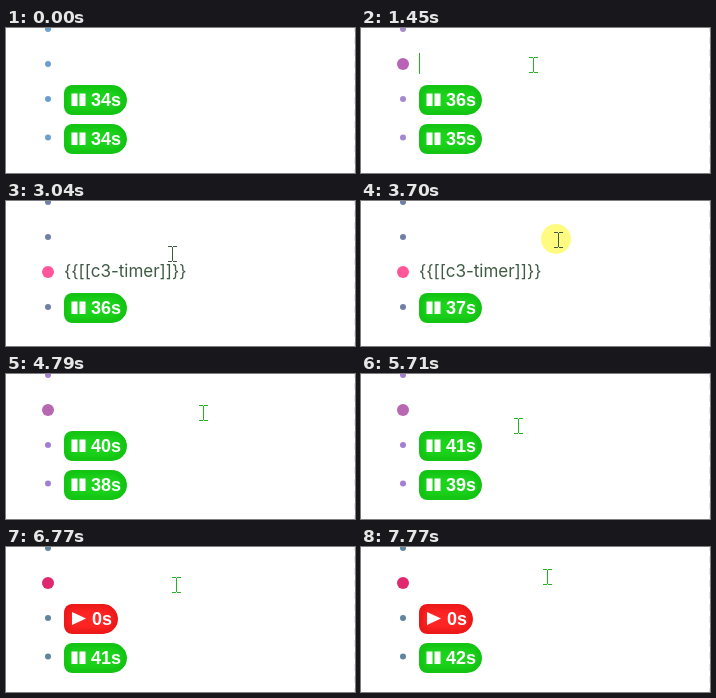
Write an HTML page with a canvas that moves like this. It is 349 by 145 pixels and loops after 8 s.

```html
<!DOCTYPE html>
<html lang="en">
<head>
<meta charset="utf-8">
<title>Timers</title>
<style>
html, body { margin: 0; width: 100%; height: 100%; overflow: hidden; background: #fff; }
canvas { display: block; }
</style>
</head>
<body>
<canvas id="stage" width="349" height="145"></canvas>
<script>
const ctx = document.getElementById('stage').getContext('2d');
const LOOP = 8000, TICK = 975, BLINK = 1050, CLICK = 90;
const GREEN = '#22b422', TEXT = '#3f5a44';

// A click comes just before each scene.
const scenes = [
  { name: 'idle', at: 0, small: '#6b9fd0' },
  { name: 'focus', at: 1440, small: '#a588d2', active: '#b963b6' },
  { name: 'edit', at: 2710, small: '#6f7fa8', active: '#ff5799' },
  { name: 'back', at: 3780, small: '#a27fd2', active: '#b868b2' },
  { name: 'press', at: 6210, small: '#7f90e2', active: '#ee5f95' },
  { name: 'paused', at: 6370, small: '#5f859f', active: '#e0286e' }
];

// Pointer moves, each from where the last one ended.
const entry = { x: 233, y: 62 };
const moves = [
  { from: 560, to: 1200, x: 172, y: 37 },
  { from: 1880, to: 2630, x: 150, y: 61 },
  { from: 2710, to: 3540, x: 197, y: 39 },
  { from: 5370, to: 6120, x: 105, y: 69 },
  { from: 6370, to: 6930, x: 186, y: 30 }
];

function pointerAt(t) {
  return moves.reduce((p, m) => {
    const u = Math.min(1, Math.max(0, (t - m.from) / (m.to - m.from)));
    const s = u * u * (3 - 2 * u);
    return { x: p.x + (m.x - p.x) * s, y: p.y + (m.y - p.y) * s };
  }, entry);
}

function disc(x, y, r, color) {
  ctx.fillStyle = color;
  ctx.beginPath();
  ctx.arc(x, y, r, 0, 7);
  ctx.fill();
}

function insetShade(shape, color) {
  const away = 400;
  ctx.shadowColor = color;
  ctx.shadowBlur = 8;
  ctx.shadowOffsetX = away;
  ctx.lineWidth = 4;
  ctx.translate(-away, 0);
  ctx.stroke(shape);
}

function button(y, seconds, fill, shade) {
  const label = seconds + 's';
  const x = seconds ? 85 : 86;
  ctx.font = 'bold 18px "Liberation Sans", Arial, sans-serif';
  const w = Math.round(ctx.measureText(label).width) + x - 52;
  const shape = new Path2D();
  shape.roundRect(58, y, w, 30, [8, 15, 15, 8]);
  ctx.save();
  ctx.clip(shape);
  ctx.fillStyle = fill;
  ctx.fill(shape);
  if (shade) insetShade(shape, shade);
  ctx.restore();

  ctx.fillStyle = '#fff';
  if (seconds) {
    for (const bar of [65.5, 73.5]) ctx.fillRect(bar, y + 8.5, 6, 12.5);
  } else {
    ctx.fill(new Path2D(`M66 ${y + 8}l14 6.5l-14 6.5z`));
  }
  ctx.fillText(label, x, y + 21);
}

const greenButton = (y, seconds) => button(y, seconds, '#1cd41c', '#06a806');
const redButton = (y, seconds) => button(y, seconds, '#ff2626', '#cc0404');

function beam(x, y, color) {
  x = Math.round(x);
  y = Math.round(y);
  ctx.fillStyle = color;
  ctx.fillRect(x, y - 7, 1, 14);
  for (const dy of [-8, 7]) {
    ctx.fillRect(x - 4, y + dy, 4, 1);
    ctx.fillRect(x + 1, y + dy, 4, 1);
  }
}

function hand(x, y, color) {
  ctx.save();
  ctx.translate(Math.round(x) - 7, Math.round(y) - 2);
  ctx.strokeStyle = color;
  ctx.lineWidth = 1;
  ctx.stroke(new Path2D('M2.5 1.5Q4 0 5.5 2V7.5Q7.5 6 8.5 8Q10.5 7 11.5 9Q14 8 14.5 11V15L12.5 21.5H5.5L0.5 13.5Q0 11 2.5 12Z'));
  ctx.restore();
}

function draw(t) {
  const scene = scenes.findLast(s => s.at <= t), step = scenes.indexOf(scene);
  const next = scenes[step + 1];
  const editing = scene.name === 'edit', paused = scene.name === 'paused';
  const clicking = next && next.at - t <= CLICK;
  const p = pointerAt(t);
  const over = !editing && p.x < 121 && p.y > 57 && p.y < 87;

  ctx.fillStyle = '#fff';
  ctx.fillRect(0, 0, 349, 145);
  ctx.fillStyle = '#e6e6e6';
  for (let y = -3; y < 145; y += 12) ctx.fillRect(348, y, 1, 7);

  const selected = step === 0 ? -1 : editing ? 2 : 1;
  [1, 36, 71, editing ? 106 : 109.5].forEach((y, i) =>
    i === selected ? disc(42, y, 6, scene.active) : disc(42, y, 3, scene.small));

  // The caret restarts its blink when the line gets focus.
  const focusAt = scenes[step < 3 ? 1 : 3].at;
  if (step > 0 && !editing && (t - focusAt) % BLINK < BLINK / 2) {
    ctx.fillStyle = GREEN;
    ctx.fillRect(58, 25, 1, 21);
  }

  // Redrawing a timer shifts its phase.
  const ticks = 34 + (t + 575) / TICK;
  const upper = paused ? 0 : Math.floor(ticks + (step >= 3 ? 1 : 0));
  const lower = Math.floor(ticks - (paused ? 0.5 : step > 0 ? 1 : 0));

  if (editing) {
    ctx.font = '17px Inter, sans-serif';
    ctx.fillStyle = TEXT;
    ctx.fillText('{{[[c3-timer]]}}', 58, 76);
  } else if (over) {
    button(57, upper, clicking || scene.name === 'press' ? '#d8e0e3' : '#e2e7ea');
  } else {
    (paused ? redButton : greenButton)(57, upper);
  }
  greenButton(editing ? 92 : 96, lower);

  if (t < moves[0].from) return;
  if (clicking) disc(p.x - 2, p.y - 1, 15, 'rgba(255,250,90,.76)');
  (over ? hand : beam)(p.x, p.y, editing ? TEXT : GREEN);
}

function frame() {
  draw(performance.now() % LOOP);
  requestAnimationFrame(frame);
}
frame();
</script>
</body>
</html>
```
